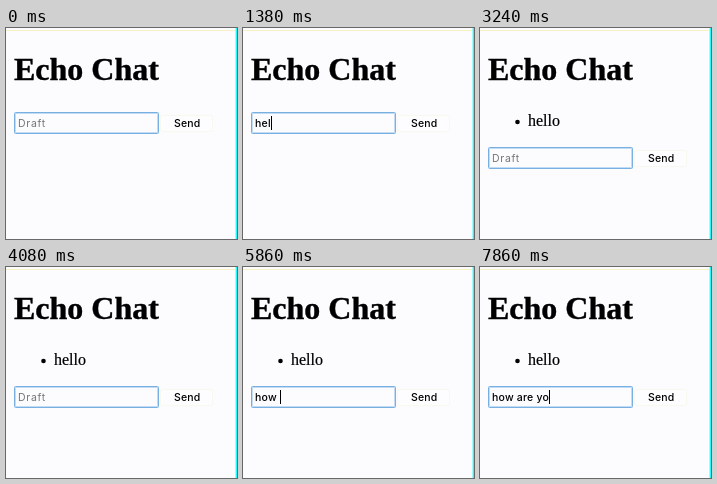
Animation, 231 px wide and 211 px high, one loop 8 s. Source, as an HTML page:

```html
<!DOCTYPE html>
<html lang="en">
<head>
<meta charset="utf-8">
<title>Echo Chat</title>
<style>
  html, body { margin: 0; width: 100%; height: 100%; overflow: hidden; background: #fcfcff; }
  svg { display: block; }
  text { white-space: pre; }
  .serif { font: 16px "Liberation Serif", serif; stroke: #000; stroke-width: .2px; }
  .title { font: bold 32px "Liberation Serif", serif; stroke: #000; stroke-width: .4px; }
  .ui { font: 500 10.5px Inter, sans-serif; letter-spacing: .2px; }
  .hint { fill: #757575; font-weight: 400; letter-spacing: .7px; }
</style>
</head>
<body>
<svg width="231" height="211" viewBox="0 0 231 211">
  <path d="M0 2.5H229" stroke="#f7f1c4"/>
  <path d="M229.5 0V211" stroke="#9ffcff"/>
  <path d="M230.5 0V211" stroke="#1ffaff"/>
  <text class="title" x="8" y="52">Echo Chat</text>
  <g id="item">
    <circle cx="37.5" cy="94" r="2.3"/>
    <text class="serif" x="48" y="98">hello</text>
  </g>
  <g id="form">
    <rect x="8.5" y="84.5" width="144" height="21" rx="1" fill="#fcfcff" stroke="#78b0e2"/>
    <rect x="9.5" y="85.5" width="142" height="19" fill="none" stroke="#c3dcf4"/>
    <rect x="154.5" y="87.5" width="52" height="16" rx="2" fill="#fdfdff" stroke="#f8f8ee"/>
    <text class="ui" x="168" y="99">Send</text>
    <text class="ui hint" id="hint" x="12" y="99">Draft</text>
    <text class="ui" id="draft" x="12" y="99"></text>
    <rect id="caret" y="88" width="1" height="14"/>
  </g>
</svg>
<script>
const LOOP = 8000, SEND = 3060, CARET_OFF = 2540;
const messages = [
  { text: 'hello', keys: [400, 720, 1140, 1540, 1940], end: SEND },
  { text: 'how are yo', keys: [4740, 5200, 5580, 5860, 5900, 6420, 6700, 6980, 7300, 7840], end: LOOP }
];
const [item, form, hint, draft, caret] =
  ['item', 'form', 'hint', 'draft', 'caret'].map(id => document.getElementById(id));
const show = (el, on) => el.setAttribute('visibility', on ? 'visible' : 'hidden');

function draw(now) {
  const t = now % LOOP;
  const sent = t >= SEND;
  const { text, keys } = messages.find(m => t < m.end);
  const typed = text.slice(0, keys.filter(k => t >= k).length);

  show(item, sent);
  form.setAttribute('transform', `translate(0 ${sent ? 35 : 0})`);
  draft.textContent = typed;
  show(hint, !typed);
  show(caret, typed && !(t >= CARET_OFF && t < SEND));
  caret.setAttribute('x', Math.round(12 + draft.getComputedTextLength()));
  requestAnimationFrame(draw);
}
draw(0);
</script>
</body>
</html>
```
